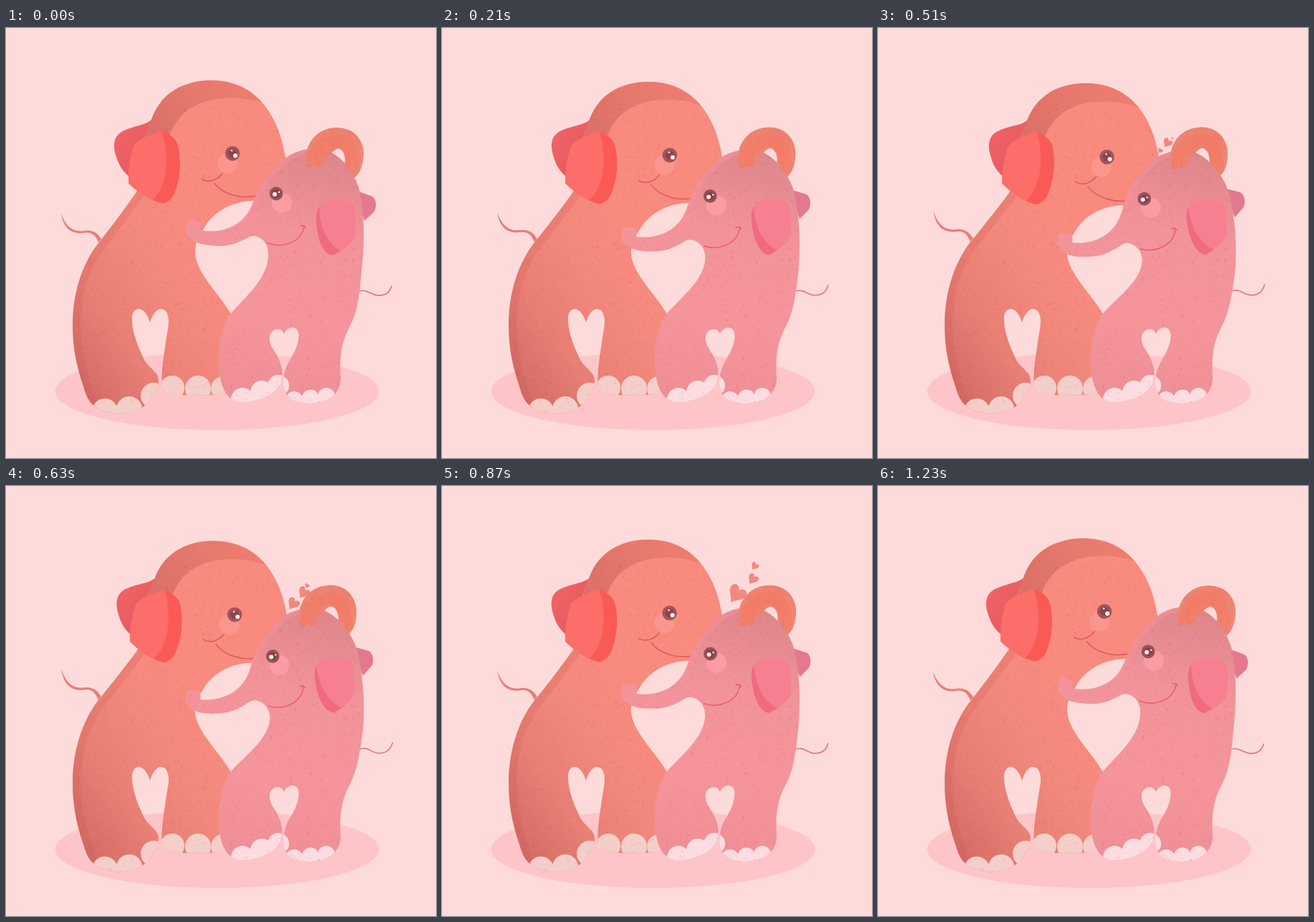
Recreate the animation shown at these times as an HTML page with a canvas. Size 600x600 px, loop 1260 ms.

```html
<!DOCTYPE html>
<html lang="en">
<head>
<meta charset="utf-8">
<title>Elephants</title>
<style>
  html, body { margin: 0; width: 100%; height: 100%; overflow: hidden; background: #fddbda; }
  canvas { display: block; }
</style>
</head>
<body>
<canvas id="stage" width="600" height="600"></canvas>
<script>
const ctx = document.getElementById('stage').getContext('2d');
const LOOP = 1260, STEP = 30, RISE = 420;

const big = {
  tail: 'M77 259 C84 280 97 285 109 283 C121 281 129 287 133 295 L129 299 C125 289 119 284 109 286 C94 288 81 282 77 260Z',
  backEar: 'M204 127 C195 136 182 135 165 143 C147 151 150 168 154 180 C158 194 166 203 173 208 L205 200Z',
  body: 'M202 131 C212 96 242 73 287 73 C346 73 380 118 390 180 L400 215 L365 242 C318 236 288 257 276 280 ' +
    'C265 297 261 308 266 325 C273 349 300 375 314 399 L320 440 L303 510 C285 513 240 515 219 507 C215 490 219 465 222 445 ' +
    'C224 427 229 412 226 402 C223 388 208 387 201 411 C194 388 179 387 176 402 C175 426 186 448 194 465 ' +
    'C203 477 213 481 213 492 C212 503 209 507 206 511 C196 532 175 540 150 538 C122 533 114 522 108 500 C97 468 93 442 93 415 ' +
    'C93 365 109 323 133 295 C153 270 174 241 185 224 L195 149Z',
  cap: 'M195 149 L202 131 C212 96 242 73 287 73 C320 73 344 87 359 105 C315 90 245 94 228 152 L215 200Z',
  rim: 'M185 224 C174 241 153 270 133 295 C109 323 93 365 93 415 C93 442 97 468 108 500 L116 525',
  ear: 'M178 164 C188 153 202 150 217 143 C229 148 238 155 240 165 C245 188 243 210 235 231 C232 238 226 243 219 245 C203 241 188 233 171 217 C170 198 173 180 178 164Z',
  earSide: 'M217 143 C229 148 238 155 240 165 C245 188 243 210 235 231 C232 238 226 243 219 245 L205 240 C224 222 230 185 217 143Z',
  mouth: 'M273 211 C283 217 295 212 302 203 M291 217 C304 233 330 240 354 233'
};
const trunk = 'M420 193 C414 180 422 139 463 139 C492 140 503 165 498 186 C496 198 491 205 486 209 L470 215 L473 184 ' +
  'C473 173 467 167 461 169 C452 174 444 186 439 192 C434 196 430 192 429 188 C427 195 422 196 420 193Z';
const trunkInner = 'M428 192 C430 170 440 158 460 157 C480 157 486 175 484 205';
const trunkFront = 'M395 125 L456 125 L456 215 L395 215Z';
const small = {
  tail: 'M489 369 C503 362 508 372 518 373 C530 374 536 368 538 360',
  backEar: 'M489 227 L511 235 C518 239 517 252 513 257 L500 269Z',
  body: 'M390 182 C402 171 424 167 440 169 C468 174 486 203 493 225 C500 255 501 300 496 340 C493 377 490 398 478 420 ' +
    'C465 445 466 470 467 490 C466 510 450 524 425 524 C400 524 387 515 387 495 C387 472 400 460 405 446 ' +
    'C411 430 409 418 400 418 C394 418 389 423 388 427 C385 419 378 419 373 422 C365 428 367 440 374 450 ' +
    'C384 465 388 480 384 494 C378 511 350 524 325 522 C303 518 296 490 297 460 C297 435 303 412 314 398 ' +
    'C335 374 365 350 366 317 C367 298 352 287 340 291 C325 300 312 304 300 304 C283 304 268 302 261 296 ' +
    'C251 291 248 280 252 276 C252 267 261 265 264 270 C270 266 274 273 271 282 C290 286 315 283 332 265 ' +
    'C346 250 346 233 360 212 C369 199 380 191 390 182Z',
  rim: 'M332 265 C346 250 346 233 360 212 C369 199 380 191 390 182 C402 171 424 167 440 169',
  ear: 'M455 239 C440 242 433 250 433 268 C434 290 440 314 455 317 C473 309 485 300 487 288 C488 270 489 250 484 246 C475 240 465 239 455 239Z',
  earSide: 'M437 249 C433 255 433 262 433 268 C434 290 440 314 455 317 L467 311 C447 300 437 275 437 249Z',
  mouth: 'M365 300 C386 308 413 299 416 276 M411 276 C414 275 417 276 418 279'
};
const bigToes = [[138, 535, 18], [172, 532, 18], [206, 513, 18], [232, 502, 17], [268, 503, 18], [303, 503, 17]];
const smallToes = [[330, 518, 16], [357, 508, 16], [380, 499, 15], [402, 519, 12], [425, 517, 12.5], [447, 514, 12]];

// Each key: time, x, y, size
const hearts = [
  [[450, 392, 176, 0], [510, 394, 171, 7], [750, 408, 157, 26], [990, 415, 143, 23], [1240, 416, 139, 0]],
  [[450, 398, 168, 0], [510, 404, 160, 13], [750, 427, 137, 19], [990, 441, 122, 10], [1110, 446, 115, 0]],
  [[480, 408, 156, 0], [510, 411, 154, 3], [750, 429, 124, 10], [990, 444, 99, 11], [1140, 448, 86, 0]]
];
const heartShape = new Path2D('M0 .6C-.15 .3 -.5 .15 -.5 -.15C-.5 -.5 -.1 -.5 0 -.2C.1 -.5 .5 -.5 .5 -.15C.5 .15 .15 .3 0 .6Z');

const easeInOut = u => u < .5 ? 2 * u * u : 1 - 2 * (1 - u) ** 2;
const lean = t => t < RISE ? easeInOut(t / RISE) : 1 - easeInOut((t - RISE) / (LOOP - RISE));

// Rotation about (cx, cy) that fades out between heights y0 and y1
const bend = (cx, cy, angle, y0, y1) => (x, y) => {
  const u = Math.min(1, Math.max(0, (y1 - y) / (y1 - y0)));
  const a = angle * u * u * (3 - 2 * u), c = Math.cos(a), s = Math.sin(a);
  return [cx + (x - cx) * c - (y - cy) * s, cy + (x - cx) * s + (y - cy) * c];
};
const shape = (d, warp) => new Path2D(d.replace(/(\d+) (\d+)/g, (m, x, y) => warp(+x, +y).join(' ')));

function gradient(x0, y0, x1, y1, ...colors) {
  const g = ctx.createLinearGradient(x0, y0, x1, y1);
  colors.forEach((c, i) => g.addColorStop(i / (colors.length - 1), c));
  return g;
}
const bigSkin = gradient(85, 480, 300, 330, '#d26b65', '#e87f74', '#f3887c', '#f88b7e');
const smallSkin = gradient(465, 165, 385, 540, '#db8589', '#f2939a', '#f5959b', '#ee8d95');
const trunkSkin = gradient(420, 145, 500, 200, '#ee8574', '#ed7f6d', '#f18a76');

function fill(path, color) { ctx.fillStyle = color; ctx.fill(path); }
function stroke(path, color, width) {
  ctx.strokeStyle = color;
  ctx.lineWidth = width;
  ctx.lineCap = 'round';
  ctx.stroke(path);
}
function dot(x, y, r, color) {
  ctx.fillStyle = color;
  ctx.beginPath();
  ctx.arc(x, y, r, 0, 7);
  ctx.fill();
}
function inside(path, draw) {
  ctx.save();
  ctx.clip(path);
  draw();
  ctx.restore();
}

function makeGrain() {
  const c = document.createElement('canvas'), g = c.getContext('2d');
  c.width = c.height = 600;
  let seed = 7;
  const rnd = () => (seed = seed * 16807 % 2147483647) / 2147483647;
  for (let i = 0; i < 9000; i++) {
    g.fillStyle = rnd() < .5 ? 'rgba(175,70,65,.08)' : 'rgba(255,190,180,.08)';
    g.beginPath();
    g.ellipse(rnd() * 600, rnd() * 600, .5 + rnd() * 1.6, .5 + rnd() * 1.3, rnd() * 3, 0, 7);
    g.fill();
  }
  return c;
}
const grain = makeGrain();

function face(warp, [ex, ey, er], [cx, cy], cheek, iris, glints) {
  dot(...warp(cx, cy), 14, cheek);
  const [x, y] = warp(ex, ey);
  dot(x, y, er, iris);
  dot(x, y, er * .6, 'rgba(100,35,45,.35)');
  glints.forEach(([dx, dy, r]) => dot(x + dx, y + dy, r, '#fff0f0'));
}

function drawBig(p) {
  const warp = bend(175, 275, .036 * p, 260, 345), part = k => shape(big[k], warp);
  fill(part('tail'), '#ea7c75');
  fill(part('backEar'), gradient(152, 150, 200, 180, '#f06367', '#e65b5f'));
  const body = part('body');
  fill(body, bigSkin);
  inside(body, () => {
    fill(part('cap'), gradient(200, 150, 340, 80, '#da7067', '#e5786c', '#ee7d70'));
    stroke(part('rim'), 'rgba(200,85,82,.2)', 22);
    bigToes.forEach(([x, y, r]) => dot(x, y, r, '#f4cfc9'));
    ctx.drawImage(grain, 0, 0);
  });
  face(warp, [316, 175, 10.3], [309, 189], '#fb968c', '#a2555a', [[4, 3, 3], [-1, -4, 1.3]]);
  stroke(part('mouth'), '#e2575a', 1.5);
  fill(part('ear'), '#fd6d69');
  fill(part('earSide'), '#fa5a56');
}

function drawSmall(p) {
  const warp = bend(450, 290, -.1 * p, 300, 385), part = k => shape(small[k], warp);
  const trunkPath = shape(trunk, warp);
  const drawTrunk = () => {
    fill(trunkPath, trunkSkin);
    inside(trunkPath, () => {
      stroke(shape(trunkInner, warp), 'rgba(244,118,94,.4)', 17);
      ctx.drawImage(grain, 0, 0);
    });
  };
  drawTrunk();
  stroke(part('tail'), '#e5757b', 1.6);
  fill(part('backEar'), '#e4788f');
  const body = part('body');
  fill(body, smallSkin);
  inside(body, () => {
    stroke(part('rim'), 'rgba(250,145,155,.45)', 13);
    smallToes.forEach(([x, y, r]) => dot(x, y, r, '#fcdde1'));
    ctx.drawImage(grain, 0, 0);
  });
  face(warp, [377, 231, 9.4], [385, 244], '#fb9ba4', '#9a5058', [[-2, 1, 3], [4, -2, 1.2]]);
  stroke(part('mouth'), '#e8596b', 1.4);
  fill(part('ear'), '#f68092');
  fill(part('earSide'), '#f06a80');
  inside(shape(trunkFront, warp), drawTrunk);
}

function drawHeart(keys, t) {
  const i = keys.findIndex(k => k[0] > t);
  if (i < 1) return;
  const a = keys[i - 1], b = keys[i], u = (t - a[0]) / (b[0] - a[0]);
  const [, x, y, size] = a.map((v, j) => v + (b[j] - v) * u);
  ctx.save();
  ctx.translate(x, y);
  ctx.rotate(.6);
  ctx.scale(size, size);
  fill(heartShape, '#f08980');
  ctx.restore();
}

function draw(now) {
  const t = Math.floor(now % LOOP / STEP) * STEP, p = lean(t);
  ctx.fillStyle = '#fddbda';
  ctx.fillRect(0, 0, 600, 600);
  ctx.fillStyle = '#fec5c9';
  ctx.beginPath();
  ctx.ellipse(294.5, 507, 226, 54, 0, 0, 7);
  ctx.fill();
  drawBig(p);
  hearts.forEach(keys => drawHeart(keys, t));
  drawSmall(p);
}

function tick() {
  draw(performance.now());
  requestAnimationFrame(tick);
}
tick();
</script>
</body>
</html>
```
